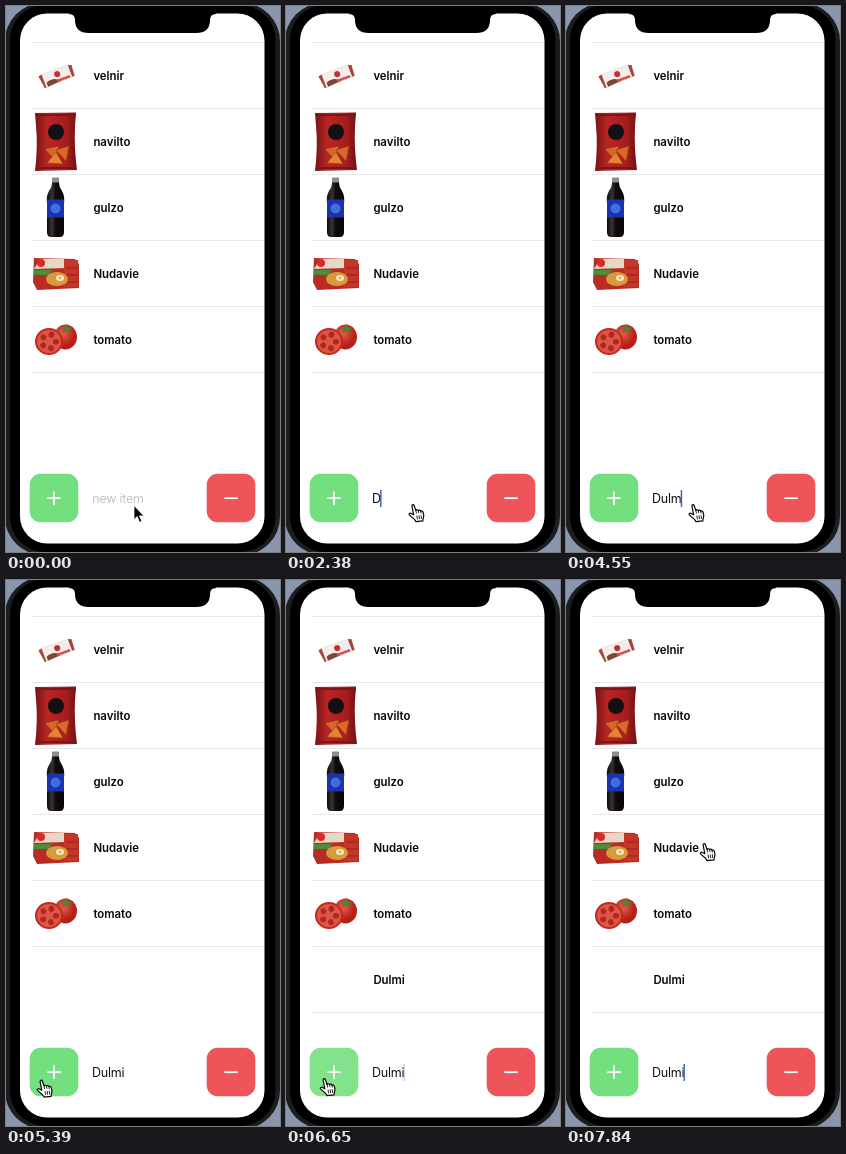
Animation, 274 px wide and 546 px high, one loop 8000 ms. Source, as an HTML page:

```html
<!DOCTYPE html>
<html lang="en">
<head>
<meta charset="utf-8">
<title>Shopping list</title>
<style>
  html, body { margin: 0; width: 100%; height: 100%; overflow: hidden; background: #8a96ac; }
  svg { display: block; width: 274px; height: 546px; }
  text { font-family: Inter, "Liberation Sans", sans-serif; }
  .label { font-size: 11.4px; font-weight: 600; fill: #050505; }
  .field { font-size: 12.5px; letter-spacing: -.25px; fill: #111; white-space: pre; }
  .rule { stroke: #e8e8ea; }
  .sign { stroke: #fff; stroke-width: 1.8; }
</style>
</head>
<body>
<svg viewBox="0 0 274 546">
  <defs>
    <linearGradient id="bag" x2="1">
      <stop offset="0" stop-color="#7a1416"/><stop offset=".3" stop-color="#b82422"/>
      <stop offset=".75" stop-color="#a81d1e"/><stop offset="1" stop-color="#6d1013"/>
    </linearGradient>
    <linearGradient id="cola" x2="1">
      <stop offset="0" stop-color="#08070a"/><stop offset=".3" stop-color="#3a3233"/>
      <stop offset=".5" stop-color="#100c0e"/><stop offset="1" stop-color="#050506"/>
    </linearGradient>
    <radialGradient id="skin" cx=".4" cy=".35">
      <stop offset="0" stop-color="#ee5a48"/><stop offset="1" stop-color="#b5201a"/>
    </radialGradient>
  </defs>

  <!-- phone body -->
  <rect width="274" height="546" fill="#8a96ac"/>
  <rect x="-1" y="-3" width="275" height="552" rx="38" fill="#1c1d1f"/>
  <rect x="4" y="-1" width="265.500" height="547" rx="35" fill="#000"/>
  <rect x="14" y="7.500" width="244.500" height="530" rx="27" fill="#fff"/>
  <path d="M63 7V8Q69 8 69 14Q69 27 83 27H190Q204 27 204 14Q204 8 210 8V7Z" fill="#000"/>

  <g id="list"></g>

  <!-- candy bar -->
  <g transform="translate(51 70) rotate(-21) scale(.87)">
    <path d="M-20-7L-17-8L17-7L20-6L19 7L-18 8Z" fill="#f3eeec" stroke="#ddd2cf" stroke-width=".6"/>
    <path d="M-20-7L-16-8V8L-18 8ZM16-7L20-6L19 7H16Z" fill="#a8423c"/>
    <path d="M-14 3Q-4-1 2 7L-14 8Z" fill="#7a4637"/>
    <path d="M-2 4H14V7H-2Z" fill="#cf5350"/>
    <circle cx="1" cy="-2" r="3.500" fill="#cc2c2e"/>
  </g>

  <!-- crisps -->
  <path d="M29 107L70 106.500L69 120Q68 142 71 164L29 165Q32 140 30 120Z" fill="url(#bag)"/>
  <path d="M30 109H70M30 162H70" stroke="#7c151a" stroke-width="2"/>
  <circle cx="50" cy="126" r="8" fill="#151013"/>
  <g fill="#d9692a" stroke="#9a3d16" stroke-width=".6" stroke-linejoin="round">
    <path d="M39 143L53 140L48 153Z"/><path d="M50 144L63 140L60 155Z"/><path d="M41 157L50 146L57 158Z" fill="#e58433"/>
  </g>

  <!-- cola bottle -->
  <path d="M46 172H53V177Q53 181 56 185Q59 190 58 198V226Q58 231 54 231H45Q41 231 41 226V198Q40 190 43 185Q46 181 46 177Z" fill="url(#cola)"/>
  <rect x="46" y="171.500" width="7" height="5" rx="1" fill="#8b8e95"/>
  <rect x="41" y="193.500" width="17" height="18" fill="#1d33ae"/>
  <circle cx="49.500" cy="202.500" r="5" fill="#3f6fd8"/>

  <!-- noodle packs -->
  <path d="M28 252L69 253L73 258V282L31 284L27 276Z" fill="#b92c24"/>
  <path d="M34 253L58 253L60 262L28 263Z" fill="#e4d9c4"/>
  <path d="M58 254H72V281H58Z" fill="#c4362a"/>
  <path d="M60 262H72M60 269H72M60 276H72" stroke="#8e201c"/>
  <path d="M28 264H46L43 269H28Z" fill="#4f8b3b"/>
  <ellipse cx="51" cy="273" rx="11" ry="7" fill="#d99a3e"/>
  <ellipse cx="54" cy="272" rx="4" ry="3" fill="#f6ead0"/>
  <circle cx="54" cy="272" r="1.500" fill="#efaa25"/>
  <circle cx="35" cy="257" r="4" fill="#d62c28"/>

  <!-- tomatoes -->
  <ellipse cx="59.500" cy="331" rx="11.500" ry="12.500" fill="url(#skin)"/>
  <path d="M53 321L59 322L61 317L62 322L68 321L63 324L65 328L60 325L56 328L57 324Z" fill="#55803a"/>
  <ellipse cx="43" cy="335.500" rx="14" ry="13.500" fill="#c2281f"/>
  <ellipse cx="43" cy="335.500" rx="12" ry="11.500" fill="#dc5646"/>
  <g id="seeds" fill="#b3271f"></g>

  <!-- input bar -->
  <g id="add">
    <rect x="23.700" y="467.700" width="48.600" height="48.600" rx="11" fill="#74df7e"/>
    <path id="plus" class="sign" d="M41.300 492.200H54.700M48 485.500V498.900"/>
  </g>
  <rect x="200.700" y="467.700" width="48.600" height="48.600" rx="11" fill="#ee555b"/>
  <path class="sign" d="M218.300 492.200H231.700"/>
  <text id="hint" class="field" x="86.300" y="497" style="fill:#c3c3c6">new item</text>
  <text id="entry" class="field" x="86" y="497"></text>
  <rect id="caret" y="484" width="1.500" height="17" fill="#4562c6"/>

  <!-- pointers -->
  <g id="ring" fill="none">
    <circle cx="38.400" cy="498.500" r="31" stroke="#aaa"/>
    <circle cx="39.300" cy="498.500" r="30.700" stroke="#111" stroke-width="1.300"/>
  </g>
  <path id="arrow" d="M128 499.500V513.500L131.200 510.600L133.500 516.300L135.900 515.300L133.500 509.900H138Z" stroke="#fff" stroke-width=".8"/>
  <g id="hand" stroke="#000" stroke-linejoin="round" stroke-linecap="round">
    <path d="M3.400 2.200C3 .4 5 .1 5.500 1.600L7 6C7.600 5 9 5.200 9.300 6.200C10 5.300 11.300 5.700 11.600 6.700C12.500 6 13.600 6.600 13.800 7.600L14.400 10.500C14.600 12 13.600 13.400 13.600 15.800L7 16.400C6.600 14.400 3 12.400 1 10.200C.2 9.200 1.600 8.200 2.800 8.800L5 10Z" fill="#fff" stroke-width="1.100"/>
    <path d="M7 6L7.600 8.500M9.300 6.200L9.800 8.300M11.600 6.700L12 8.500M8 11.200L8.500 14M10 11L10.400 13.800M12 10.800L12.200 13.600" fill="none" stroke-width=".8"/>
  </g>
</svg>
<script>
const LOOP = 8000, ROW = 66, NEW_ITEM = "Dulmi";
const FOCUS = 420, PRESS = 6230, RELEASE = 6300;
const TYPED = [2380, 2940, 3850, 4410, 4690];
const MOVES = [
  { from: 5110, to: 5390, x: 30.5, y: 499.5 },
  { from: 5880, to: 6090, x: 33.5, y: 498 },
  { from: 7000, to: 7800, x: 133.5, y: 263 },
];
const $ = id => document.getElementById(id);

function make(parent, tag, attrs, text = "") {
  const el = document.createElementNS("http://www.w3.org/2000/svg", tag);
  for (const k in attrs) el.setAttribute(k, attrs[k]);
  el.textContent = text;
  return parent.appendChild(el);
}
const rule = (parent, i) => make(parent, "path", { class: "rule", d: `M26 ${36.5 + ROW * i}H258` });

function addRow(name, i) {
  const row = make($("list"), "g", {});
  make(row, "text", { class: "label", x: 87.4, y: 73.5 + ROW * i }, name);
  rule(row, i + 1);
  return row;
}
rule($("list"), 0);
const newRow = ["velnir", "navilto", "gulzo", "Nudavie", "tomato", NEW_ITEM].map(addRow).pop();

for (let a = 20; a < 360; a += 72) {
  make($("seeds"), "ellipse", { cx: 43, cy: 328.5, rx: 2.8, ry: 3, transform: `rotate(${a} 43 335.5)` });
}

const ramp = (t, from, to) => Math.min(1, Math.max(0, (t - from) / (to - from)));
const smooth = u => u * u * (3 - 2 * u);
const easeOut = u => 1 - (1 - u) ** 2;
const fade = (el, v) => el.setAttribute("opacity", v);

// Solid for a moment after each key, then blinking every 700 ms
function caretAlpha(t) {
  if (t < FOCUS) return 0;
  const last = TYPED.filter(k => k <= t).pop() ?? FOCUS - 280;
  const idle = t - last - 490;
  if (idle < 0) return 1;
  const p = idle % 700;
  return 1 - ramp(p, 0, 100) + ramp(p, 280, 380);
}

function handAt(t) {
  let x = 122.3, y = 498;
  for (const m of MOVES) {
    const u = smooth(ramp(t, m.from, m.to));
    x += (m.x - x) * u;
    y += (m.y - y) * u;
  }
  return `translate(${x} ${y}) scale(1.07)`;
}

function draw(t) {
  const text = NEW_ITEM.slice(0, TYPED.filter(k => t >= k).length);
  const entry = $("entry");
  if (entry.textContent !== text) entry.textContent = text;
  fade($("hint"), text ? 0 : 1);
  $("caret").setAttribute("x", text ? 85.3 + entry.getComputedTextLength() : 86.2);
  fade($("caret"), caretAlpha(t));

  const lit = t < PRESS ? 1 : .2 + .8 * easeOut(ramp(t, RELEASE, 6860));
  fade($("add"), lit);
  fade($("plus"), lit);
  fade($("ring"), t >= PRESS && t < RELEASE ? 1 : 0);
  fade(newRow, ramp(t, RELEASE, 6550));

  fade($("arrow"), 1 - ramp(t, 69, 140));
  fade($("hand"), t >= FOCUS ? 1 : 0);
  $("hand").setAttribute("transform", handAt(t));
}

const start = performance.now();
function tick() {
  draw((performance.now() - start) % LOOP);
  requestAnimationFrame(tick);
}
tick();
</script>
</body>
</html>
```
